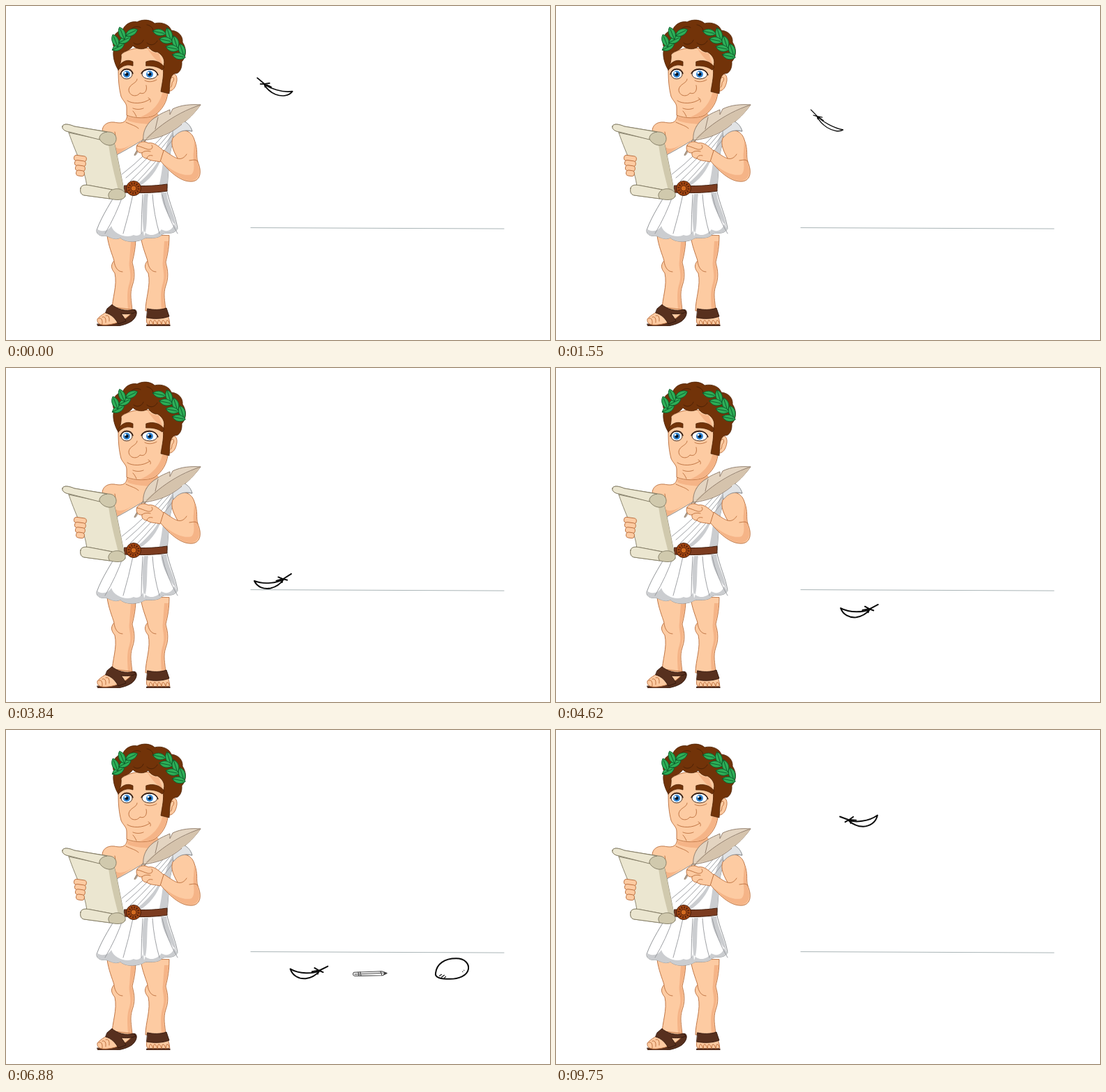
Recreate the animation shown at these times as an HTML page. Size 780 by 480 pixels, loop 9.88 s.

```html
<!DOCTYPE html>
<html lang="en">
<head>
<meta charset="utf-8">
<title>Falling objects</title>
<style>
html, body { margin: 0; width: 100%; height: 100%; overflow: hidden; background: #fff; }
svg { display: block; width: 780px; height: 480px; }
path { stroke-linejoin: round; stroke-linecap: round; }
.skin { fill: #fdcba2; stroke: #b96c3a; stroke-width: .9; }
.shade { fill: #f5b487; }
.crease { fill: none; stroke: #b96c3a; stroke-width: .9; }
.hair { fill: #723309; stroke: #4d2206; stroke-width: .8; }
.leaf { fill: #2eae57; stroke: #0b5c2c; stroke-width: .9; }
.cloth { fill: #fff; stroke: #85888c; stroke-width: .9; }
.fold { fill: #cbcdd0; }
.pleat { fill: none; stroke: #93969a; stroke-width: .9; }
.paper { fill: #ebe6d0; stroke: #807a62; stroke-width: .9; }
.roll { fill: #d0c9ad; stroke: #807a62; stroke-width: .9; }
.quill { fill: #e3d4c1; stroke: #8b7765; stroke-width: .9; }
.strap { fill: #57301e; stroke: #32170c; stroke-width: .9; }
.ink { fill: none; stroke: #0b0b0b; stroke-width: 2; }
.pencil { fill: #fff; stroke: #484848; stroke-width: 1.1; }
</style>
</head>
<body>
<svg viewBox="0 0 780 480">
  <defs>
    <clipPath id="floor"><path d="M0 0H780V460H0Z"/></clipPath>
    <g id="leg">
      <path class="skin" d="M145 330C147 345 152 356 155 366C148 374 153 380 156 384C160 402 152 420 152 438H181C180 424 177 414 181 402C187 386 182 374 181 368C184 356 186 346 186 330Z"/>
      <path class="shade" d="M179 338H185C184 354 181 362 180 368C184 384 182 392 179 404C176 414 179 425 180 437H175C174 420 173 410 177 398C181 384 175 376 177 366Z"/>
      <path class="crease" d="M155 367C156 375 160 382 167 382"/>
    </g>
  </defs>
  <g clip-path="url(#floor)">
    <!-- legs and sandals -->
    <use href="#leg"/>
    <use href="#leg" x="48"/>
    <path class="strap" d="M131 457C150 460 172 452 184 436C190 438 187 448 180 453C170 460 150 463 132 460Z"/>
    <path class="skin" d="M152 433C147 440 136 443 131 450C130 457 136 459 146 458C160 457 176 449 183 437Z"/>
    <path class="strap" d="M145 435L152 429C158 435 172 440 183 436L186 440C180 443 170 443 165 442C168 446 171 450 172 453L161 457C157 449 151 443 143 441Z"/>
    <path class="skin" d="M203 442C201 450 200 458 206 458H233C236 456 234 449 230 441Z"/>
    <path class="strap" d="M202 458H235V463H202ZM203 435C211 437 222 437 230 434L234 446C224 450 212 450 202 448Z"/>
    <path class="crease" id="toes"/>

    <!-- neck and chest -->
    <path class="skin" d="M174 152C174 166 170 170 155 167C144 166 138 172 138 180L150 250H200L244 172C232 170 220 162 215 152Z"/>
    <path class="shade" d="M174 159C186 163 206 162 217 155C220 160 224 164 230 167L214 171C200 169 184 169 174 164ZM154 200C160 208 170 206 184 196L156 216Z"/>
    <path class="crease" d="M172 167C180 171 186 172 190 176M201 173C204 170 212 168 218 168M156 181C158 190 156 196 153 201"/>

    <!-- tunic -->
    <path class="cloth" d="M162 262H230C234 284 244 303 246 320C240 330 230 324 224 328C218 336 203 332 198 334C190 340 170 340 164 333C156 338 146 330 142 330C134 332 129 326 130 322C138 300 152 280 162 262Z"/>
    <path class="fold" d="M131 321C140 326 148 322 151 316C155 329 174 334 183 329C189 332 194 328 197 322C202 332 216 331 223 321C230 326 240 322 241 312L246 320C240 330 230 324 224 328C218 336 203 332 198 334C190 340 170 340 164 333C156 338 146 330 142 330C134 332 129 326 131 321ZM198 270C194 290 196 314 198 331C204 318 201 290 204 270ZM222 268C224 290 236 306 245 319C241 298 232 284 230 268Z"/>
    <path class="cloth" d="M242 163C252 163 262 168 267 180C255 178 245 182 241 190C236 205 234 215 233 235L231 262H163L153 217C184 201 215 181 242 163Z"/>
    <path class="fold" d="M241 190C236 205 234 215 233 235L231 260H219C226 234 224 206 238 181ZM188 256C206 242 218 226 226 207C221 232 208 248 193 258Z"/>
    <path class="pleat" id="pleats"/>
    <path d="M170 258C190 259 212 259 231 256V266C212 269 190 269 170 268Z" fill="#7c3c20" stroke="#44200f"/>
    <circle cx="183" cy="262" r="10.5" fill="#a44713" stroke="#4a1d08"/>
    <circle cx="183" cy="262" r="7" fill="none" stroke="#5d2408" stroke-width="3" stroke-dasharray="1.7 1.97"/>
    <circle cx="183" cy="262" r="4" fill="#d26a20" stroke="#5d2408"/>

    <!-- writing arm -->
    <path class="skin" d="M241 186C250 174 266 178 270 192C276 208 272 214 275 224C281 238 279 250 268 252C252 254 236 240 221 222L226 207C236 214 242 218 246 219C238 205 235 195 241 186Z"/>
    <path class="shade" d="M270 194C274 207 272 214 274 224C280 238 277 249 267 251C252 252 238 240 225 226C242 240 256 245 266 242C273 236 267 218 269 210Z"/>
    <path class="crease" d="M246 219C251 221 256 218 259 213M263 222C270 221 273 220 275 224"/>
    <path class="cloth" style="fill:#e1e3e5" d="M242 163C254 163 264 168 267 180C256 177 247 180 240 189C238 180 239 170 242 163Z"/>

    <!-- head -->
    <path class="skin" d="M233 101C238 94 246 97 245 107C244 116 239 124 232 122Z"/>
    <path class="crease" d="M236 104C241 99 242 106 239 109C237 111 239 114 236 117"/>
    <path class="skin" d="M162 72C160 95 161 115 165 130C168 137 173 139 173 146V157C184 162 204 162 213 157C224 149 231 138 232 124L234 80C220 55 180 55 162 72Z"/>
    <path class="shade" d="M225 88L232 122C230 137 224 148 213 156C206 160 198 161 192 160C210 153 222 139 225 121ZM202 60C207 66 213 68 219 68L225 86C216 79 208 70 202 60Z"/>
    <path class="hair" d="M161 92C155 82 152 70 155 60C150 48 156 36 167 35C170 26 180 21 188 23C197 18 208 20 213 25C225 22 235 28 237 35C248 36 254 44 253 52C260 62 258 74 252 80C253 90 248 98 242 97C238 99 236 102 235 110L234 126L222 123C224 110 227 98 225 88C230 78 224 70 217 66C212 67 206 62 204 58C198 64 186 62 182 57C176 66 168 64 165 70C166 78 163 86 161 92Z"/>
    <path d="M178 35C181 30 188 28 193 31M202 27C207 28 211 31 211 36M202 53C207 58 214 56 217 50M183 53C187 57 195 55 197 49" fill="none" stroke="#4d2206"/>
    <g id="wreath"></g>
    <path class="hair" d="M161 88C166 79 174 76 182 80L182 86C174 83 167 86 162 91ZM201 80C211 76 222 80 227 88L224 92C216 86 208 86 201 86Z"/>
    <g stroke="#321a0f" stroke-width=".9" fill="#fff">
      <ellipse cx="173" cy="98" rx="8" ry="6.800"/><ellipse cx="206" cy="98" rx="11" ry="6.800"/>
    </g>
    <g id="irises"></g>
    <path d="M164 98C167 88 179 88 182 97M194 97C199 88 213 88 218 99" fill="none" stroke="#321a0f" stroke-width="1.4"/>
    <path class="crease" d="M188 105C188 111 177 112 176 120C176 129 187 132 192 125C199 128 203 121 201 114M174 136C180 141 197 141 206 134M204 132C207 133 208 136 207 138M182 147C187 149 192 149 197 147M187 159C185 155 184 153 182 151M199 107C204 110 211 109 216 106"/>

    <!-- scroll -->
    <path class="paper" d="M90 182L155 196C160 216 165 245 171 274L116 264C116 240 101 215 90 182Z"/>
    <path d="M147 199L155 196C160 216 165 245 171 272L162 268C156 245 150 222 147 199Z" fill="#d0c9ad"/>
    <path class="roll" d="M81 173C82 168 91 170 98 173L147 181C158 181 161 192 155 198C149 203 138 199 134 191L91 181C84 180 80 177 81 173Z"/>
    <path class="paper" d="M81 173C82 168 91 170 98 173L145 181C137 182 133 187 134 192L91 181C84 180 80 177 81 173Z"/>
    <path class="roll" d="M107 262C108 256 115 257 121 258L153 264C162 260 173 266 171 273C169 280 157 279 149 277L112 272C107 271 106 266 107 262Z"/>
    <path class="paper" d="M107 262C108 256 115 257 121 258L152 264C147 268 145 272 149 277L112 272C107 271 106 266 107 262Z"/>
    <g id="fingers" class="skin"></g>

    <!-- quill and hand -->
    <path class="quill" d="M184 214L197 190L201 192L186 214Z"/>
    <path class="quill" d="M197 193C195 178 205 165 216 159C222 154 229 152 235 149L235 156L239 148C251 142 266 141 279 142C273 151 264 160 257 166L248 167L252 170C240 180 224 190 197 193Z"/>
    <path d="M200 190C220 171 245 156 279 142C270 155 258 166 251 170C240 180 222 190 200 190Z" fill="#d5c3ac"/>
    <path class="quill" style="fill:none" d="M185 213C204 181 240 155 279 142M214 177L218 160"/>
    <path class="skin" d="M188 200C192 194 199 194 204 197C213 195 221 204 226 208L221 224C213 222 207 223 202 219C197 219 194 215 195 211C189 212 185 206 188 200Z"/>
    <path class="crease" d="M188 201C194 202 199 205 203 206C208 207 212 204 209 200M195 211C198 208 203 208 207 209M202 219C203 215 206 214 210 215"/>
  </g>

  <path d="M351 318.6L714 320.1" stroke="#a9b4b6"/>

  <g id="feather" class="ink">
    <path fill="#fff" d="M-15 6C-5 9 14 9 27.500 0C25 10 16 15.500 6 15.500C-4 15-10 11-15 6Z"/>
    <path d="M-27.500 0L-14 5.500M-20 8L-14 5L-8 1M-14 5L-4 6M-14 5L-12 10"/>
  </g>
  <g id="pencil" class="pencil">
    <path d="M-23-2L17-3.500L24-.7L18 2.500L-22 3.200C-25 3-25-1-23-2Z"/>
    <path d="M-22 .8L18-1M-17-2.300L-16 3M-14-2.400L-13 3M15-3.500L17 2.500"/>
    <path d="M20-2.300L24-.7L20 1.200Z" fill="#333"/>
  </g>
  <g id="stone" class="ink">
    <path fill="#fff" d="M-23.500 6C-22-7-11-15 6-15C19-15 24.500-7 23.500 0C22 10 9 14.500-3 14.500C-15 14.500-25 13-23.500 6Z"/>
    <path stroke-width="1.100" d="M-18 10L-15 8M-15 12L-11 9M-11 13L-9 11M15 4H15.500M17 2H17.400"/>
  </g>
</svg>
<script>
const LOOP = 9880, RESET = 9420;
const el = id => document.getElementById(id);
const repeat = (n, make) => Array.from({ length: n }, (_, i) => make(i)).join('');
const mix = (a, b, k) => a + (b - a) * k;

// a twig: every second leaf stands off the stem by (dx, dy), turned by its own angle
const twig = (n, [x0, y0], [x1, y1], [dx, dy], angles) => repeat(n, i => {
  const k = i / (n - 1), odd = i % 2;
  return `<path class="leaf" transform="translate(${mix(x0, x1, k) + odd * dx} ${mix(y0, y1, k) + odd * dy})
    rotate(${angles[odd]}) scale(.95)" d="M-10 0C-5-7 5-6 10 0C5 6-5 7-10 0ZM-10 0H7"/>`;
});
el('wreath').innerHTML =
  twig(5, [161, 59], [180, 38], [-9, -4], [-26, -112]) + twig(7, [220, 38], [248, 72], [9, -3], [12, 72]);

el('irises').innerHTML = [173, 206].map(x =>
  `<circle cx="${x}" cy="98" r="5" fill="#3488d6"/><circle cx="${x}" cy="98" r="2.5" fill="#071322"/>
   <circle cx="${x - 2}" cy="96" r="1.5" fill="#fff"/>`).join('');

el('fingers').innerHTML = repeat(4, i =>
  `<rect x="${96 + i * 2}" y="${215 + i * 7}" width="${18 - i * 2}" height="8" rx="4" transform="rotate(8 105 229)"/>`);

el('toes').setAttribute('d',
  repeat(5, i => `M${205 + i * 6} 458q1-13 6-1`) + repeat(3, i => `M${133 + i * 5} ${449 - i * 2}q6-2 5 8`));

el('pleats').setAttribute('d',
  repeat(4, i => `M${166 + i * 6} ${242 + i * 5}Q${200 + i * 5} ${216 + i * 3} ${236 + i} ${174 + i * 6}`) +
  repeat(5, i => `M${168 + i * 14} 271Q${158 + i * 18} 300 ${142 + i * 26} 327`));

// feather key points: time, centre x, centre y, angle
const path = [
  [0, 385.5, 113, 21], [200, 434, 123.5, -2], [560, 446, 129, 0], [860, 432, 131, 10],
  [1520, 388.5, 163.5, 32], [1930, 416, 205, 8], [2840, 422, 245.5, -1], [3300, 409, 297, 127],
  [3840, 382, 301, 170], [4620, 435, 342.5, 174.5], [4750, 444, 340.5, 175], [5080, 434.5, 341.5, 176]
];

// the feather jerks twice per beat, and moves in short steps during its wide swing
function jerky(t) {
  if (t < 200) return 0;
  if (t >= 860 && t < 1730) return 860 + Math.floor((t - 860) / 66) * 66;
  const beat = (t - 200) % 330;
  return t - beat + (beat < 130 ? 0 : 130);
}

function moveFeather(t) {
  const now = Math.min(jerky(t), path.at(-1)[0]);
  const next = Math.max(1, path.findIndex(p => p[0] >= now));
  const a = path[next - 1], b = path[next];
  const k = (now - a[0]) / (b[0] - a[0]);
  const [, x, y, angle] = a.map((v, i) => mix(v, b[i], k));
  const flip = angle > 90 ? -1 : 1;
  const lean = flip > 0 ? angle : 180 - angle;
  const depth = Math.max(.6, 1 - (lean / 50) ** 2);
  el('feather').setAttribute('transform', `translate(${x} ${y}) rotate(${angle}) scale(.98 ${flip * depth})`);
}

function drop(id, t, begin, duration, x, top, bottom) {
  const node = el(id), step = 70;
  const p = Math.min(1, Math.max(0, Math.floor((t - begin) / step) * step / duration));
  node.style.display = t >= begin && t < RESET ? '' : 'none';
  node.setAttribute('transform', `translate(${x} ${mix(top, bottom, p ** 1.5)})`);
}

function draw(t) {
  moveFeather(t < RESET ? t : t < 9750 ? 0 : 200);
  drop('pencil', t, 5340, 770, 522, 97, 350.3);
  drop('stone', t, 6390, 490, 639.5, 107, 343.3);
}

const start = performance.now();
function tick() {
  draw((performance.now() - start) % LOOP);
  requestAnimationFrame(tick);
}
tick();
</script>
</body>
</html>
```
